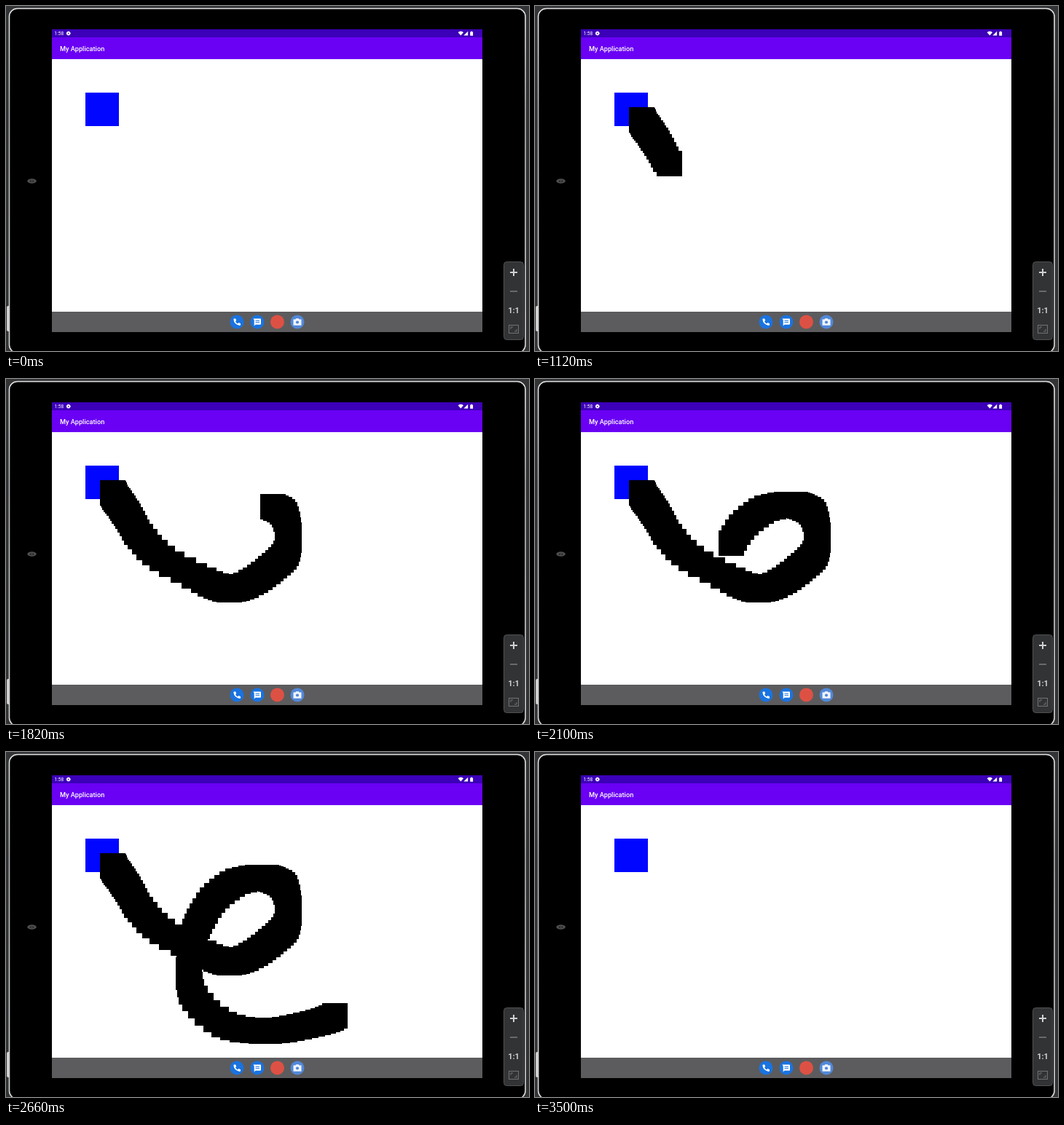
These frames come from a looping animation (718 px wide and 474 px high, 4.83 s). An HTML page:

```html
<!DOCTYPE html>
<html lang="en">
<head>
<meta charset="utf-8">
<title>Drawing app</title>
<style>
  html, body { margin: 0; width: 100%; height: 100%; overflow: hidden; background: #2f3032; }
  svg { display: block; width: 100%; height: 100%; }
  text { font-family: Roboto, "Noto Sans", sans-serif; }
  .crisp { shape-rendering: crispEdges; }
</style>
</head>
<body>
<svg viewBox="0 0 718 474">
  <defs>
    <linearGradient id="rim" x1="0" y1="0" x2="0" y2="1">
      <stop offset="0" stop-color="#e4e4e4"/>
      <stop offset=".3" stop-color="#b4b4b4"/>
      <stop offset="1" stop-color="#d8d8d8"/>
    </linearGradient>
  </defs>

  <!-- Tablet body -->
  <rect width="718" height="474" fill="#333436"/>
  <rect x="1" y="412" width="5" height="35" rx="2" fill="#d0d0d0"/>
  <rect x="4.5" y="3.5" width="708.5" height="473" rx="11" fill="#000" stroke="url(#rim)" stroke-width="1.6"/>
  <ellipse cx="35.5" cy="240.5" rx="6.2" ry="3.2" fill="#505050"/>
  <ellipse cx="35.5" cy="240.5" rx="3.2" ry="1.6" fill="#2c2c2c"/>
  <circle cx="35.5" cy="240.5" r=".8" fill="#666"/>

  <!-- App screen -->
  <g class="crisp">
    <rect x="63" y="32" width="591" height="416" fill="#fff"/>
    <rect x="63" y="32" width="591" height="11" fill="#3c00b8"/>
    <rect x="63" y="43" width="591" height="30" fill="#6a00f4"/>
    <rect x="63" y="420" width="591" height="28" fill="#5c5c5e"/>
    <rect x="109" y="119" width="46" height="46" fill="#0006ff"/>
    <path id="trail"/>
  </g>
  <path id="cursor" transform="translate(512 257)" d="M.5 .5V14.5L3.8 11.5 6 16.5 8.3 15.5 6.1 10.7H11Z"
        fill="#fff" stroke="#000" display="none"/>

  <!-- Bars -->
  <g fill="#fff">
    <text x="66.5" y="40.2" font-size="6.5">1:58</text>
    <text x="74" y="61.7" font-size="9.2" font-weight="500">My Application</text>
    <circle cx="85.7" cy="37.6" r="2.5" stroke="#fff" stroke-dasharray="1.2 .8"/>
    <circle cx="85.7" cy="37.6" r=".9" fill="#3c00b8"/>
    <path d="M620.6 36.3Q624.3 33.4 628 36.3L624.3 40.6Z"/>
    <path d="M634.2 34.8V40.6H628.4Z"/>
    <path d="M637.2 35.6H638.3V34.7H640V35.6H641.1V40.7H637.2Z"/>
  </g>

  <!-- Dock -->
  <circle cx="317" cy="434" r="9.5" fill="#1a73e0"/>
  <path d="M313.2 429.6L315.2 429.4 316.2 432.1 315 433.4Q316 435.4 318.1 436.4L319.4 435.1 322 436.2V438.2Q321.6 439.1 320.4 438.9 313.2 437.4 312.4 430.7Q312.4 429.8 313.2 429.6Z" fill="#fff"/>
  <circle cx="345" cy="434" r="9.5" fill="#1a73e0"/>
  <path d="M339.5 429.5H349Q350 429.5 350 430.5V436.7Q350 437.7 349 437.7H342.5L340.7 439.4V431.5Z" fill="#fff"/>
  <path d="M342.5 432.3H348M342.5 434.7H348" stroke="#1a73e0"/>
  <circle cx="372.5" cy="434" r="9.5" fill="#dd5144"/>
  <circle cx="400" cy="434" r="9.5" fill="#5288d8"/>
  <path d="M394.5 430.6H397.3L398.2 429.2H401.8L402.7 430.6H405.5V438.7H394.5Z" fill="#f0f4fc"/>
  <circle cx="400" cy="434.5" r="2.1" fill="#5288d8"/>

  <!-- Zoom controls -->
  <rect x="683.5" y="351.5" width="27" height="107" rx="4" fill="#323334" stroke="#505152"/>
  <path d="M692 366H702M697 361V371" stroke="#d0d0d0" stroke-width="2"/>
  <path d="M692 392H702" stroke="#696969" stroke-width="2"/>
  <text x="697" y="422" font-size="11" font-weight="700" fill="#d0d0d0" text-anchor="middle">1:1</text>
  <g fill="none" stroke="#727272">
    <rect x="690.5" y="438.5" width="13" height="11"/>
    <path d="M693 444V441H696M701 444V447H698"/>
  </g>
</svg>
<script>
  const LOOP = 4830, TICK = 70;
  const DRAW_START = 840, CLEAR = 3290, CURSOR_ON = 3430, CURSOR_OFF = 3500;
  const BRUSH = 35, STAMPS_PER_TICK = 4;

  // Brush corner at each tick of the stroke
  const stroke = [
    [129, 139], [134, 147.5], [143, 160], [153, 176], [167, 199], [197, 229],
    [254, 259], [283, 271], [306, 268], [331, 255], [351, 239], [367, 222],
    [371, 197], [365, 169], [349, 158], [335, 155], [301, 160], [272, 180],
    [252, 208], [240, 238], [233, 282], [242, 321], [282, 357], [333, 366],
    [375, 362], [411, 354], [434, 345], [454, 329], [470, 306], [487, 280],
    [513, 258]
  ];

  const trail = document.getElementById("trail");
  const cursor = document.getElementById("cursor");

  const knot = i => stroke[Math.max(0, Math.min(stroke.length - 1, i))];

  function catmullRom(a, b, c, d, u) {
    return b + u / 2 * (c - a + u * (2 * a - 5 * b + 4 * c - d + u * (3 * (b - c) + d - a)));
  }

  function brushAt(position) {
    const i = Math.floor(position), u = position - i;
    return [0, 1].map(axis => Math.round(catmullRom(
      knot(i - 1)[axis], knot(i)[axis], knot(i + 1)[axis], knot(i + 2)[axis], u)));
  }

  const stamps = [];
  for (let n = 0; n <= (stroke.length - 1) * STAMPS_PER_TICK; n++) {
    const [x, y] = brushAt(n / STAMPS_PER_TICK);
    stamps.push(`M${x} ${y}h${BRUSH}v${BRUSH}h-${BRUSH}z`);
  }

  function render(time) {
    const drawing = time >= DRAW_START && time < CLEAR;
    const tick = Math.floor((time - DRAW_START) / TICK);
    const count = drawing ? tick * STAMPS_PER_TICK + 1 : 0;
    trail.setAttribute("d", stamps.slice(0, count).join(""));
    const pointing = time >= CURSOR_ON && time < CURSOR_OFF;
    cursor.setAttribute("display", pointing ? "inline" : "none");
  }

  const start = performance.now();
  function frame() {
    render((performance.now() - start) % LOOP);
    requestAnimationFrame(frame);
  }
  frame();
</script>
</body>
</html>
```
